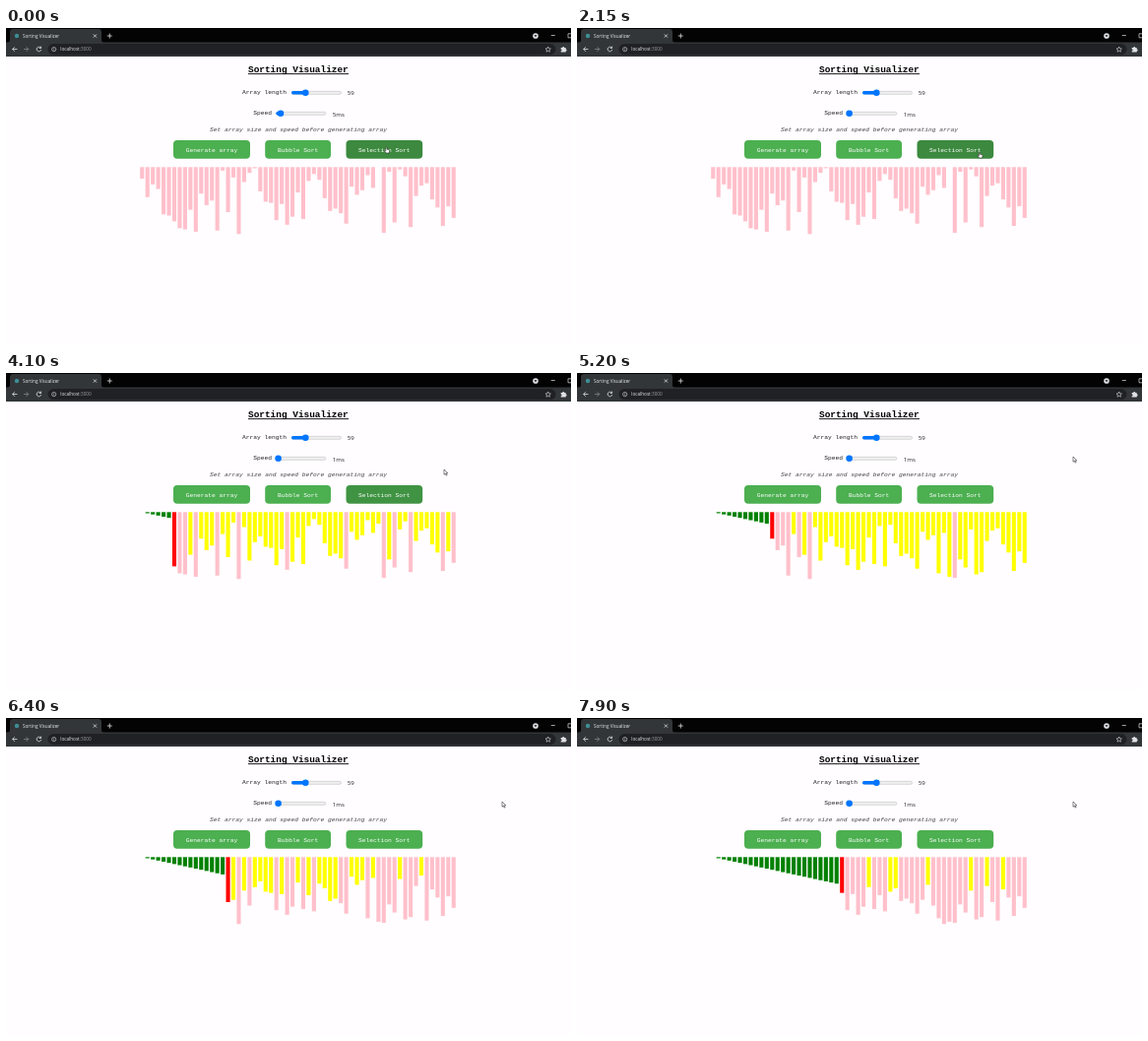
These frames come from a looping animation (574 by 322 pixels, 8 s). An HTML page:

```html
<!DOCTYPE html>
<html lang="en">
<head>
<meta charset="utf-8">
<title>Sorting Visualizer</title>
<style>
  html, body { margin: 0; width: 100%; height: 100%; overflow: hidden; background: #fffdff; }
  svg { display: block; width: 574px; height: 322px; }
  .mono { font: 6.26px "Liberation Mono", monospace; fill: #222; }
  .ui { font: 6.1px "Open Sans", sans-serif; fill: #222; }
  .chrome { font: 4.65px "Open Sans", sans-serif; fill: #e8eaed; }
  .title { font-weight: bold; font-size: 9.43px; fill: #000; }
  .label { fill: #fff; text-anchor: middle; }
  .icon { fill: none; stroke: #dfe1e5; stroke-width: .8; }
</style>
</head>
<body>
<svg viewBox="0 0 574 322">
  <rect width="574" height="322" fill="#fffdff"/>

  <!-- browser frame -->
  <rect width="574" height="16" fill="#030303"/>
  <path d="M1 15Q4 15 4 12V4Q4 1 7 1H94Q97 1 97 4V12Q97 15 100 15Z" fill="#323639"/>
  <rect y="14.5" width="574" height="14.5" fill="#323639"/>
  <rect x="42.5" y="16" width="516" height="11.2" rx="5.6" fill="#202124"/>
  <circle cx="11" cy="8" r="2.2" fill="#3f8f96"/>
  <text class="chrome" x="17" y="9.7">Sorting Visualizer</text>
  <g class="icon">
    <path d="M88.8 6.4l3.2 3.2m0-3.2l-3.2 3.2M102.8 8h5M105.3 5.5v5"/>
    <path d="M11.4 21.5H6.6M8.9 19.2l-2.3 2.3 2.3 2.3"/>
    <path d="M18 21.5h4.8M20.5 19.2l2.3 2.3-2.3 2.3" stroke="#85888c"/>
    <path d="M35.2 20a2.3 2.3 0 1 0 .5 2M35.6 18.6v1.9h-1.9"/>
    <circle cx="48.7" cy="21.6" r="2.1" stroke-width=".6"/>
    <path d="M48.7 21.3v1.3M48.7 20.2v.5" stroke-width=".6"/>
    <path d="M550.7 19l.8 1.8 1.9.2-1.4 1.3.4 1.9-1.7-1-1.7 1 .4-1.9-1.4-1.3 1.9-.2z" stroke-width=".6"/>
    <path d="M553.8 7.5h4M571 5.8h4v4h-4z" stroke-width=".7"/>
  </g>
  <circle cx="538" cy="8" r="2.8" fill="#dfe1e5"/>
  <path d="M536.5 7.2h3l-1.5 2z" fill="#111"/>
  <path d="M563.7 20h1.5a1 1 0 0 1 2 0h1.5v1.5a1 1 0 0 1 0 2v1h-5v-1.2a.9.9 0 0 0 0-1.8z" fill="#dfe1e5"/>
  <text class="chrome" x="55.3" y="23.3">localhost<tspan fill="#9aa0a6">:3000</tspan></text>

  <!-- page -->
  <text class="mono title" x="246" y="45">Sorting Visualizer</text>
  <path d="M246 46.6H348" stroke="#000" stroke-width=".9"/>
  <text class="mono" x="240" y="67.4">Array length</text>
  <text class="ui" x="346.7" y="68.3">59</text>
  <text class="mono" x="251.2" y="88.4">Speed</text>
  <text class="ui" x="331.8" y="89.5" id="speed"></text>
  <text class="mono" x="207" y="104.6" font-style="italic" style="font-style:italic;fill:#444">Set array size and speed before generating array</text>

  <g id="sliders"></g>
  <g id="buttons"></g>
  <g id="bars"></g>
  <g id="cursor" stroke="#222" stroke-width=".55" stroke-linejoin="round" fill="#fff">
    <path id="arrow" d="M0 0V5.3L1.3 4.1 2.2 6.1 3.1 5.7 2.2 3.8H3.9Z"/>
    <path id="hand" d="M-.6.4Q0-.4.5.4V2.2L2.6 2.7Q3.2 2.9 3.1 3.7L2.6 6H-.4L-1.9 3.7Q-1.9 3-1.2 3.2L-.6 3.7Z"/>
  </g>
</svg>
<script>
const LOOP = 8000, STEP = 50;
const TOP = 141.3, LEFT = 136.2, PITCH = 5.457, UNIT = 1.172;
// shuffled ranks 0..58
const START = [10, 26, 15, 19, 41, 42, 47, 53, 54, 37, 56, 23, 33, 29, 55, 3, 39, 9, 58, 13,
  5, 1, 21, 30, 31, 46, 32, 50, 43, 22, 45, 12, 6, 11, 27, 38, 36, 40, 49, 17,
  24, 20, 7, 18, 0, 57, 4, 48, 2, 8, 52, 25, 16, 14, 28, 35, 51, 34, 44];

// keyframes: [time, value, ...]
const PROGRESS = [[2180, 0], [4100, 384], [5200, 588], [6400, 838], [7150, 985], [7900, 1118]];
const HOVER = [[350, 1], [750, 0], [1500, 0], [1900, 1], [4000, 1], [4400, 0]];
const SPEED = [[950, 5], [1250, 1]];
const POINTER = [[200, 386.5, 121], [850, 279, 85.5], [950, 279, 85.5], [1250, 276.5, 85.5],
  [1800, 421, 125], [2050, 409, 126], [3950, 409, 126], [4100, 445, 98], [4350, 500, 83], [4500, 504, 85]];

const $ = id => document.getElementById(id);

function add(parent, tag, attrs) {
  const el = document.createElementNS("http://www.w3.org/2000/svg", tag);
  for (const k in attrs) el.setAttribute(k, attrs[k]);
  return parent.appendChild(el);
}

function at(keys, t) {
  const n = keys.findIndex(k => k[0] > t);
  if (n === 0) return keys[0].slice(1);
  if (n < 0) return keys[keys.length - 1].slice(1);
  const a = keys[n - 1], b = keys[n], f = (t - a[0]) / (b[0] - a[0]);
  return a.slice(1).map((v, i) => v + (b[i + 1] - v) * f);
}

function slider(x, y, thumb) {
  const g = $("sliders");
  add(g, "rect", { x, y: y - 1.5, width: 50.5, height: 3, rx: 1.5, fill: "#efefef", stroke: "#b5b5b5", "stroke-width": .5 });
  const fill = add(g, "rect", { x, y: y - 1.7, width: thumb - x, height: 3.4, rx: 1.7, fill: "#0075ff" });
  const knob = add(g, "circle", { cx: thumb, cy: y, r: 3.3, fill: "#0075ff" });
  return pos => { fill.setAttribute("width", pos - x); knob.setAttribute("cx", pos); };
}

function button(x, width, label) {
  const g = $("buttons");
  const box = add(g, "rect", { x, y: 114, width, height: 18.8, rx: 4, fill: "#4caf50" });
  add(g, "text", { x: x + width / 2, y: 125.6, class: "mono label" }).textContent = label;
  return box;
}

slider(290, 65.8, 304.3);
const moveSpeed = slider(274.3, 86.8, 279);
button(170, 78, "Generate array");
button(263.2, 66.8, "Bubble Sort");
const selection = button(345.5, 77.7, "Selection Sort");
const bars = START.map((_, i) => add($("bars"), "rect", { x: LEFT + i * PITCH, y: TOP, width: 4.1 }));

// selection sort stopped after a number of comparisons
function sortState(steps) {
  const a = [...START], color = a.map(() => "#ffc0cb");
  for (let i = 0; i < a.length - 1 && steps > 0; i++) {
    let min = i;
    color[i] = "#ff0000";
    for (let j = i + 1; j < a.length; j++) {
      if (steps-- <= 0) return { a, color };
      color[j] = a[j] < a[i] ? "#ffff00" : "#ffc0cb";
      if (a[j] < a[min]) min = j;
    }
    if (steps <= 0) break;
    [a[i], a[min]] = [a[min], a[i]];
    color[i] = "#008000";
  }
  return { a, color };
}

function draw(t) {
  const { a, color } = sortState(Math.floor(at(PROGRESS, t)[0]));
  bars.forEach((bar, i) => {
    bar.setAttribute("height", a[i] * UNIT);
    bar.setAttribute("fill", color[i]);
  });

  const ms = Math.round(at(SPEED, t)[0]);
  $("speed").textContent = ms + "ms";
  moveSpeed(276.6 + (ms - 1) * .6);

  const h = at(HOVER, t)[0], mix = (p, q) => Math.round(p + (q - p) * h);
  selection.setAttribute("fill", `rgb(${mix(76, 60)},${mix(175, 137)},${mix(80, 63)})`);

  const [x, y] = at(POINTER, t);
  const over = x > 345.5 && x < 423.2 && y > 114 && y < 132.8;
  $("cursor").setAttribute("transform", `translate(${x} ${y})`);
  $("hand").style.display = over ? "" : "none";
  $("arrow").style.display = over ? "none" : "";
}

function frame() {
  const t = performance.now() % LOOP;
  draw(Math.floor(t / STEP) * STEP);
  requestAnimationFrame(frame);
}
frame();
</script>
</body>
</html>
```
